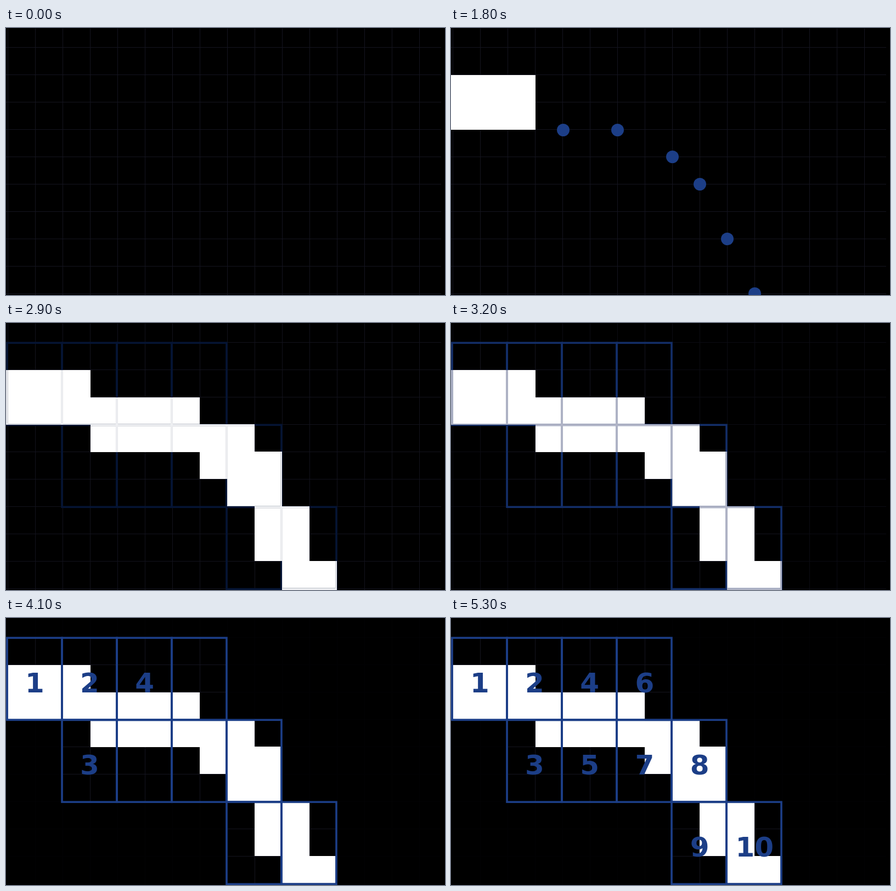
Animation of 800x488 px, one loop 6.5 s. Source, as an HTML page:

```html
<!DOCTYPE html>
<html lang="en">
<head>
<meta charset="utf-8">
<title>Covering points with grid cells</title>
<style>
html, body { margin: 0; width: 100%; height: 100%; overflow: hidden; background: #000; }
svg { display: block; width: 800px; height: 488px; }
text { font: bold 50px "DejaVu Sans", Verdana, sans-serif; text-anchor: middle; }
</style>
</head>
<body>
<svg id="stage" viewBox="0 0 800 488"></svg>
<script>
const LOOP = 6500;
const BLUE = [28, 62, 135], WHITE = [255, 255, 255], BLACK = [0, 0, 0], GRID = [20, 20, 31];
const rgb = c => `rgb(${c.map(Math.round)})`;
const stage = document.getElementById("stage");

function add(parent, tag, attrs = {}, label) {
  const el = document.createElementNS("http://www.w3.org/2000/svg", tag);
  for (const k in attrs) el.setAttribute(k, attrs[k]);
  if (label !== undefined) el.textContent = label;
  parent.appendChild(el);
  return el;
}

// Colours are blended in linear light.
const toLin = v => (v /= 255) <= 0.04045 ? v / 12.92 : ((v + 0.055) / 1.055) ** 2.4;
const toRgb = v => 255 * (v <= 0.0031308 ? v * 12.92 : 1.055 * v ** (1 / 2.4) - 0.055);
const mix = (a, b, t) => rgb(a.map((v, i) => toRgb(toLin(v) * (1 - t) + toLin(b[i]) * t)));

// Point centre, then the top left corner of its square.
const points = [
  [3.5, 135.5, -46, 86], [103.5, 136, 54, 86], [204.5, 186.5, 154, 136], [303.5, 186.5, 253, 136],
  [403.5, 235.5, 353, 185], [453.5, 285.5, 403, 235], [503.5, 385.5, 453, 335], [553.5, 485.5, 503, 435]
];
// Column and row, in counting order.
const cells = [[0, 0], [1, 0], [1, 1], [2, 0], [2, 1], [3, 0], [3, 1], [4, 1], [4, 2], [5, 2]];

const defs = add(stage, "defs");
const inCells = add(defs, "clipPath", { id: "cells" });
const inSquares = add(defs, "clipPath", { id: "squares" });
const cellBox = ([c, r]) => ({ x: 2 + 100 * c, y: 36.3 + 150 * r, width: 100, height: 150 });
const squareBox = ([, , x, y]) => ({ x, y, width: 100, height: 100, "shape-rendering": "crispEdges" });
cells.forEach(c => add(inCells, "rect", cellBox(c)));
points.forEach(p => add(inSquares, "rect", squareBox(p)));

let gridPath = "";
for (let x = 3; x < 793; x += 50) gridPath += `M${x} 1h1v487h-1z`;
for (let y = 35; y < 488; y += 50) gridPath += `M0 ${y}h793v1h-793z`;
const outerGrid = add(stage, "path", { d: gridPath });
add(stage, "path", { d: gridPath, fill: rgb(GRID), "clip-path": "url(#cells)" });
const innerGrid = stage.lastChild;

const dots = points.map(([cx, cy]) => add(stage, "circle", { cx, cy, r: 11.5, fill: rgb(BLUE) }));
const squares = points.map(p => add(stage, "rect", { ...squareBox(p), fill: "#fff" }));

function frames(attrs) {
  const g = add(stage, "g", { fill: "none", "stroke-width": 3.6, ...attrs });
  cells.forEach(c => add(g, "rect", cellBox(c)));
  return g;
}
const onBlack = frames({});
const onWhite = frames({ "clip-path": "url(#squares)" });

const numbers = cells.map(([c, r], i) =>
  add(stage, "text", { x: 52.3 + 100.2 * c, y: 136 + 150 * r, fill: rgb(BLUE) }, i + 1));

const show = (el, on) => el.setAttribute("visibility", on ? "visible" : "hidden");
const reveal = (els, t, start, step) => els.forEach((el, i) => show(el, t >= start + step * i));

function draw(t) {
  reveal(dots, t, 500, 100);
  reveal(squares, t, 1700, 100);
  reveal(numbers, t, 3500, 200);
  const fade = Math.max(0, Math.min(7, Math.floor((t - 2800) / 100))) / 7;
  outerGrid.setAttribute("fill", mix(GRID, BLACK, fade * 0.92));
  onBlack.setAttribute("stroke", mix(BLACK, BLUE, fade));
  onWhite.setAttribute("stroke", mix(WHITE, BLUE, fade));
  [innerGrid, onBlack, onWhite].forEach(el => show(el, fade > 0));
}

const start = performance.now();
function tick() {
  draw((performance.now() - start) % LOOP);
  requestAnimationFrame(tick);
}
tick();
</script>
</body>
</html>
```
